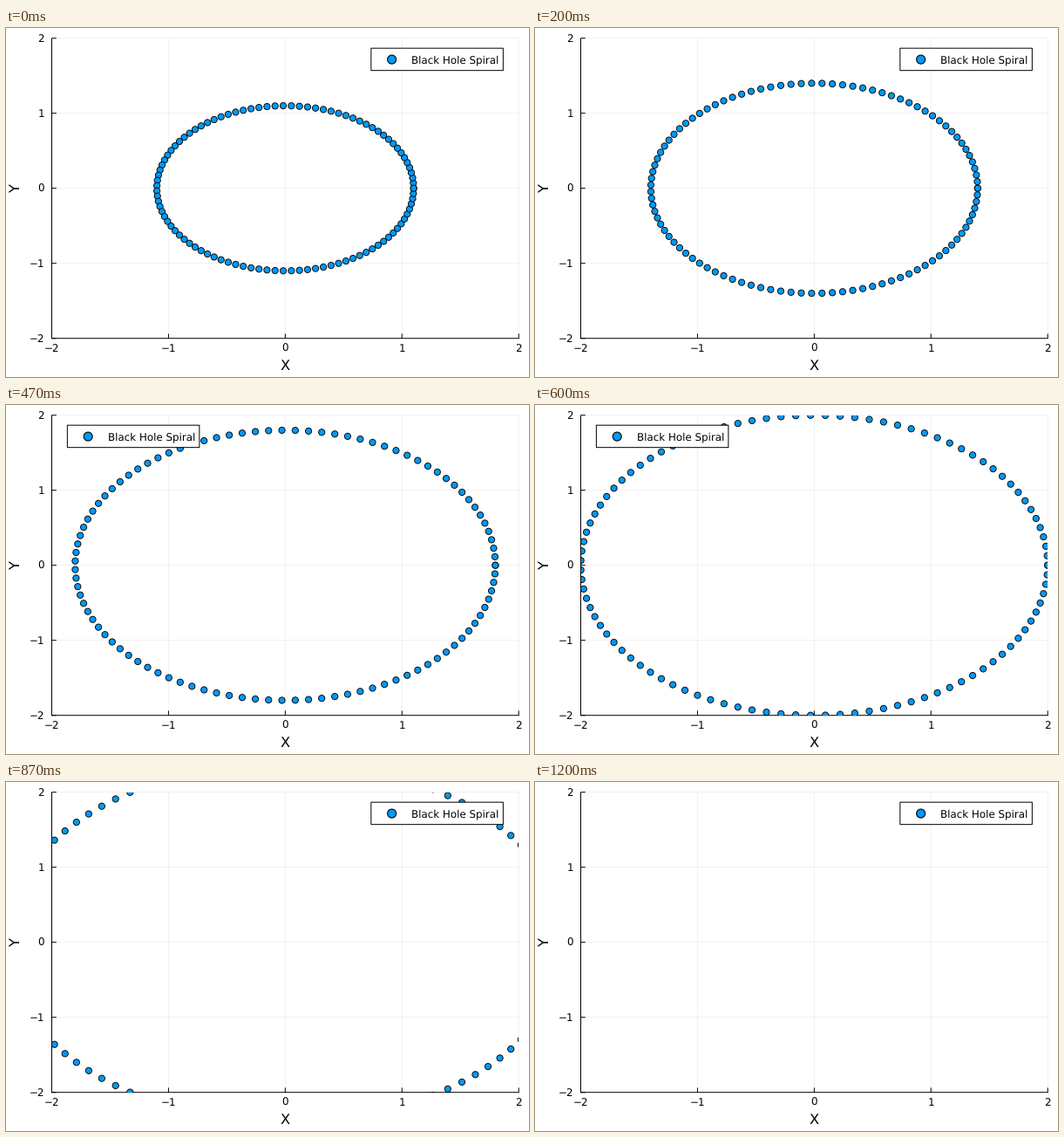
A matplotlib script for the animation above (6670 ms loop, 600 by 400 pixels).

```python
import numpy as np
import matplotlib.pyplot as plt
from matplotlib.animation import FuncAnimation
from matplotlib.patches import Circle, Rectangle

plt.rcParams.update({"font.family": "DejaVu Sans", "text.hinting": "none"})

PX = 0.72  # points per pixel at 100 dpi
BLUE = "#009AFA"
LEFT, RIGHT, TOP, BOTTOM = 52.5, 588.2, 11.7, 355.7
WIDTH, HEIGHT = RIGHT - LEFT, BOTTOM - TOP
LEGEND_W, LEGEND_H = 151.5, 25.5
LEGEND_LEFT = LEFT + WIDTH / 30
LEGEND_RIGHT = RIGHT - WIDTH / 30 - LEGEND_W
LEGEND_TOP = TOP + HEIGHT / 30
LEGEND_LEFT_STEPS = {4, 5, 7, 8, 9, 11, 16}  # steps with a freer upper left corner

fig = plt.figure(figsize=(6, 4), dpi=100, facecolor="white")
ax = fig.add_axes([0, 0, 1, 1])
ax.set(xlim=(0, 600), ylim=(400, 0))
ax.axis("off")


def to_x(x):
    return LEFT + (x + 2) / 4 * WIDTH


def to_y(y):
    return BOTTOM - (y + 2) / 4 * HEIGHT


def line(x0, y0, x1, y1, alpha=1.0):
    ax.plot([x0, x1], [y0, y1], color="black", alpha=alpha, lw=PX,
            solid_capstyle="butt", snap=False, zorder=1)


def label(x, y, s, size=11.85, **kw):
    return ax.text(x, y, s, fontsize=size * PX, va="baseline", **kw)


# grid, axes and ticks
for v in range(-1, 3):
    x, y = to_x(v), to_y(v)
    line(x, TOP, x, BOTTOM, 0.06)
    line(LEFT, y, RIGHT, y, 0.06)
for v in range(-2, 3):
    x, y = to_x(v), to_y(v)
    line(x, BOTTOM, x, BOTTOM - 5.3)
    line(LEFT, y, LEFT + 5.3, y)
    name = str(v).replace("-", "\u2212")
    label(x, 371.2, name, ha="center")
    label(44.0, y + 4.2, name, ha="right")
line(LEFT, TOP, LEFT, BOTTOM + 0.5)
line(LEFT, BOTTOM, RIGHT + 0.5, BOTTOM)
label(to_x(0), 392.4, "X", 16.3, ha="center")
label(16.4, to_y(0), "Y", 16.3, ha="center", rotation=90, rotation_mode="anchor")

# ring of points, the last one on top of the first
theta = np.linspace(0, 2 * np.pi, 100)
ring = ax.scatter(theta, theta, s=np.full(100, (7.2 * PX) ** 2), c=BLUE,
                  edgecolors="black", linewidths=0.9 * PX, zorder=3)
ring.set_clip_path(Rectangle((LEFT, TOP), WIDTH, HEIGHT, transform=ax.transData))

# legend
box = ax.add_patch(Rectangle((LEGEND_RIGHT, LEGEND_TOP), LEGEND_W, LEGEND_H, fc="white",
                             ec="black", lw=PX, snap=False, zorder=4))
dot = ax.add_patch(Circle((0, 36.1), 5.0, fc=BLUE, ec="black", lw=PX * 1.1, zorder=5))
title = label(0, 40.6, "Black Hole Spiral", zorder=5)


def draw(i):
    step = int((i + 0.5) * 3 / 20)  # 15 steps per second on a 10 ms clock
    r = 1.1 + 0.1 * step
    ring.set_offsets(np.column_stack([to_x(r * np.cos(theta)), to_y(r * np.sin(theta))]))
    x = LEGEND_LEFT if step in LEGEND_LEFT_STEPS else LEGEND_RIGHT
    box.set_x(x)
    dot.center = (x + 23.8, 36.1)
    title.set_x(x + 46.2)
    return ring, box, dot, title


anim = FuncAnimation(fig, draw, frames=667, init_func=lambda: draw(0),
                     interval=10, repeat=True)
plt.show()
```
